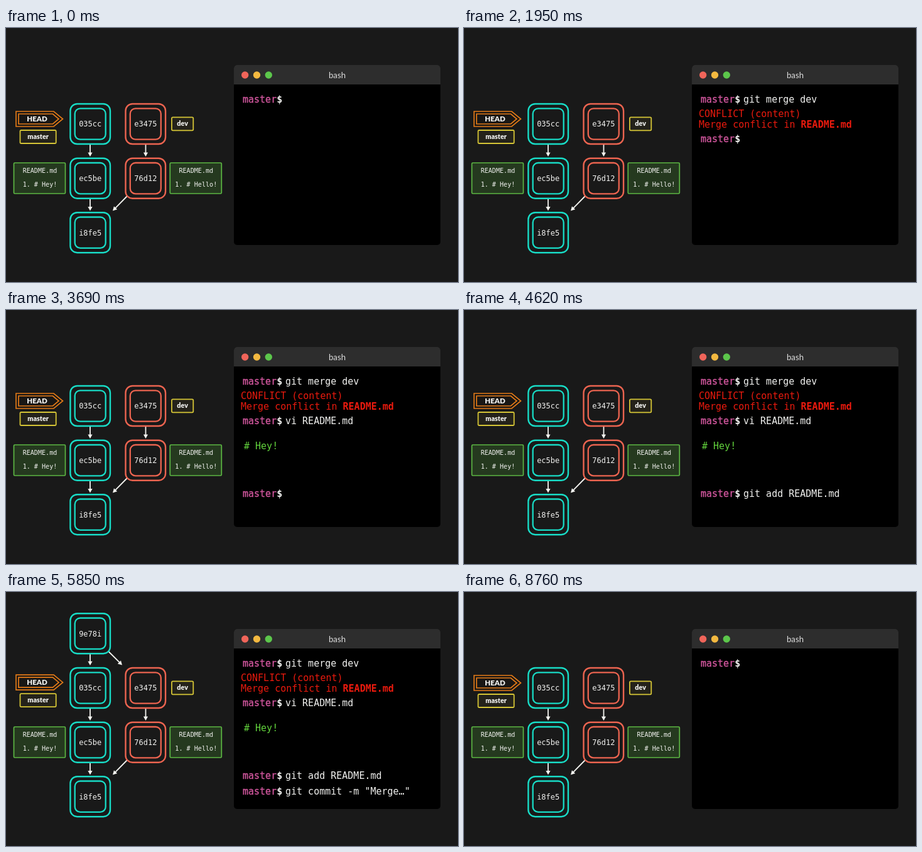
Write an HTML page that moves like this. It is 720x405 px and loops after 8790 ms.

```html
<!DOCTYPE html>
<html lang="en">
<head>
<meta charset="utf-8">
<title>Merge conflict</title>
<style>
  html, body { margin: 0; width: 100%; height: 100%; overflow: hidden; background: #191919; }
  svg { display: block; width: 100vw; height: 100vh; }
  .mono { font-family: "DejaVu Sans Mono", monospace; }
  .label { font-family: Lato, sans-serif; font-weight: 900; }
  .term { font-size: 15px; }
  text { fill: #f2f2f0; }
</style>
</head>
<body>
<svg id="stage" viewBox="0 0 720 405"></svg>
<script>
const LOOP = 8790, RESET = 8760;
const TEAL = '#18dcc6', CORAL = '#ec6450', RED = '#ea1a0e', GREEN = '#62d33c', PINK = '#cf569c', YELLOW = '#d5c536';
const stage = document.getElementById('stage');

function add(parent, tag, attrs, content) {
  const el = document.createElementNS('http://www.w3.org/2000/svg', tag);
  for (const key in attrs) el.setAttribute(key, attrs[key]);
  if (content !== undefined) el.textContent = content;
  parent.append(el);
  return el;
}
const group = (parent = stage) => add(parent, 'g', {});

function box(parent, x, y, w, h, r, stroke, width, fill = 'none') {
  return add(parent, 'rect', { x, y, width: w, height: h, rx: r, stroke, 'stroke-width': width, fill });
}

function centered(parent, cls, size, x, y, content) {
  return add(parent, 'text', { class: cls, 'font-size': size, x, y, 'text-anchor': 'middle' }, content);
}

function commit(x, y, color, hash) {
  const g = group();
  box(g, x - 31.8, y - 32, 63.6, 64, 11, color, 2.4);
  box(g, x - 24.5, y - 24.7, 49, 49.4, 8.5, color, 2.3);
  centered(g, 'mono', 12, x, y + 4.3, hash);
  return g;
}

// Returns a function that draws the arrow up to a share of its length.
function arrow(x1, y1, x2, y2) {
  const g = group(), length = Math.hypot(x2 - x1, y2 - y1);
  const angle = Math.atan2(y2 - y1, x2 - x1) * 180 / Math.PI;
  g.setAttribute('transform', `translate(${x1} ${y1}) rotate(${angle})`);
  const shaft = add(g, 'path', { stroke: '#f4f4f0', 'stroke-width': 1.8 });
  const head = add(g, 'path', { fill: '#f4f4f0' });
  return share => {
    const tip = length * share;
    g.style.display = share > 0 ? '' : 'none';
    shaft.setAttribute('d', `M0 0H${Math.max(0, tip - 5)}`);
    head.setAttribute('d', `M${tip} 0l-6.5 -3.6v7.2z`);
  };
}

function tag(parent, x, y, w, name) {
  box(parent, x, y, w, 21, 1.8, YELLOW, 1.8, '#24221a');
  centered(parent, 'label', 10.8, x + w / 2, y + 14, name);
}

function file(x, line) {
  box(stage, x, 215, 82, 49, 1.5, '#5cb843', 1.7, '#25391f');
  centered(stage, 'mono', 10.1, x + 41.5, 230.5, 'README.md');
  centered(stage, 'mono', 10.1, x + 41.5, 252.5, line);
}

function term(parent, x, y, content, fill = '#f2f2f0') {
  return add(parent, 'text', { class: 'mono term', x, y, style: `fill:${fill}` }, content);
}

function prompt(y) {
  const g = group();
  term(g, 377, y, 'master', PINK).setAttribute('stroke', PINK);
  g.firstChild.setAttribute('stroke-width', 0.35);
  term(g, 431.2, y, '$').setAttribute('font-weight', 700);
  return g;
}

function command(y, words, start) {
  const el = term(stage, 445, y, '');
  return t => {
    const count = Math.floor(words.length * ramp(t, start, 570) + 1e-6);
    el.textContent = words.slice(0, count);
  };
}

const ramp = (t, start, duration) => Math.min(1, Math.max(0, (t - start) / duration));
const smooth = p => p * p * (3 - 2 * p);

// Commit graph
[[134, 185, 134, 205], [222.5, 185, 222.5, 205], [134, 272, 134, 291.5], [193, 268, 170, 291.5]]
  .forEach(line => arrow(...line)(1));
const newArrows = [arrow(134, 98, 134, 117), arrow(163.5, 95, 185, 116.5)];
commit(134.2, 153, TEAL, '035cc');
commit(222.3, 153, CORAL, 'e3475');
commit(134.2, 239.7, TEAL, 'ec5be');
commit(222.3, 239.7, CORAL, '76d12');
commit(134.2, 326.2, TEAL, 'i8fe5');
const merged = commit(134.2, 66.2, TEAL, '9e78i');
file(12.5, '1. # Hey!');
file(261.3, '1. # Hello!');
tag(stage, 264, 142.3, 34.3, 'dev');

const pointer = group();
for (const d of ['M16 133H76L90.5 145L76 157H16Z', 'M20 137H74.5L84 145L74.5 153H20Z'])
  add(pointer, 'path', { d, fill: '#191715', stroke: '#e27a18', 'stroke-width': 1.7 });
centered(pointer, 'label', 11.6, 49.5, 149, 'HEAD');
tag(pointer, 22.5, 163, 57.2, 'master');

// Terminal window
box(stage, 363, 59, 329, 287, 5, 'none', 0, '#000');
add(stage, 'path', { d: 'M363 90V64a5 5 0 0 1 5-5H687a5 5 0 0 1 5 5V90Z', fill: '#2d2d2d' });
['#f0655a', '#f3b940', '#5cc64b'].forEach((fill, i) =>
  add(stage, 'circle', { cx: 380.7 + i * 18.8, cy: 75, r: 5.7, fill }));
add(stage, 'text', { x: 527.5, y: 79.5, 'text-anchor': 'middle', 'font-size': 13.2,
  style: 'font-family:Lato,sans-serif;fill:#dedede' }, 'bash');

prompt(119);
const conflict = group();
term(conflict, 374, 142, 'CONFLICT (content)', RED);
add(term(conflict, 374, 159.3, 'Merge conflict in ', RED), 'tspan', { 'font-weight': 700 }, 'README.md');
const prompts = [[182, 1350], [298, 3405], [322.5, 4930]].map(([y, start]) => ({ el: prompt(y), start }));

const kept = group(), dropped = group();
['<<<<<<< HEAD', '# Hey!', '=======', '# Hello!', '>>>>>>> dev'].forEach((line, i) =>
  term(i === 1 ? kept : dropped, 379, 204.3 + i * 17.3, line, GREEN));

const commands = [
  command(119, 'git merge dev', 480),
  command(182, 'vi README.md', 1950),
  command(298, 'git add README.md', 4050),
  command(322.5, 'git commit -m "Merge…"', 4950)
];

function draw(time) {
  const t = time < RESET ? time : 0;
  commands.forEach(type => type(t));
  conflict.style.opacity = ramp(t, 1050, 300);
  prompts.forEach(({ el, start }) => el.style.opacity = ramp(t, start, 270));
  const shown = ramp(t, 2550, 300);
  kept.style.opacity = shown;
  dropped.style.opacity = shown * (1 - ramp(t, 3120, 285));
  const born = ramp(t, 5550, 300);
  merged.style.opacity = born;
  newArrows.forEach(grow => grow(1 - (1 - born) ** 2.5));
  const rise = smooth(ramp(t, 5835, 285));
  pointer.setAttribute('transform', `translate(${0.4 * rise} ${-92.8 * rise})`);
}

const began = performance.now();
function tick() {
  draw((performance.now() - began) % LOOP);
  requestAnimationFrame(tick);
}
tick();
</script>
</body>
</html>
```
